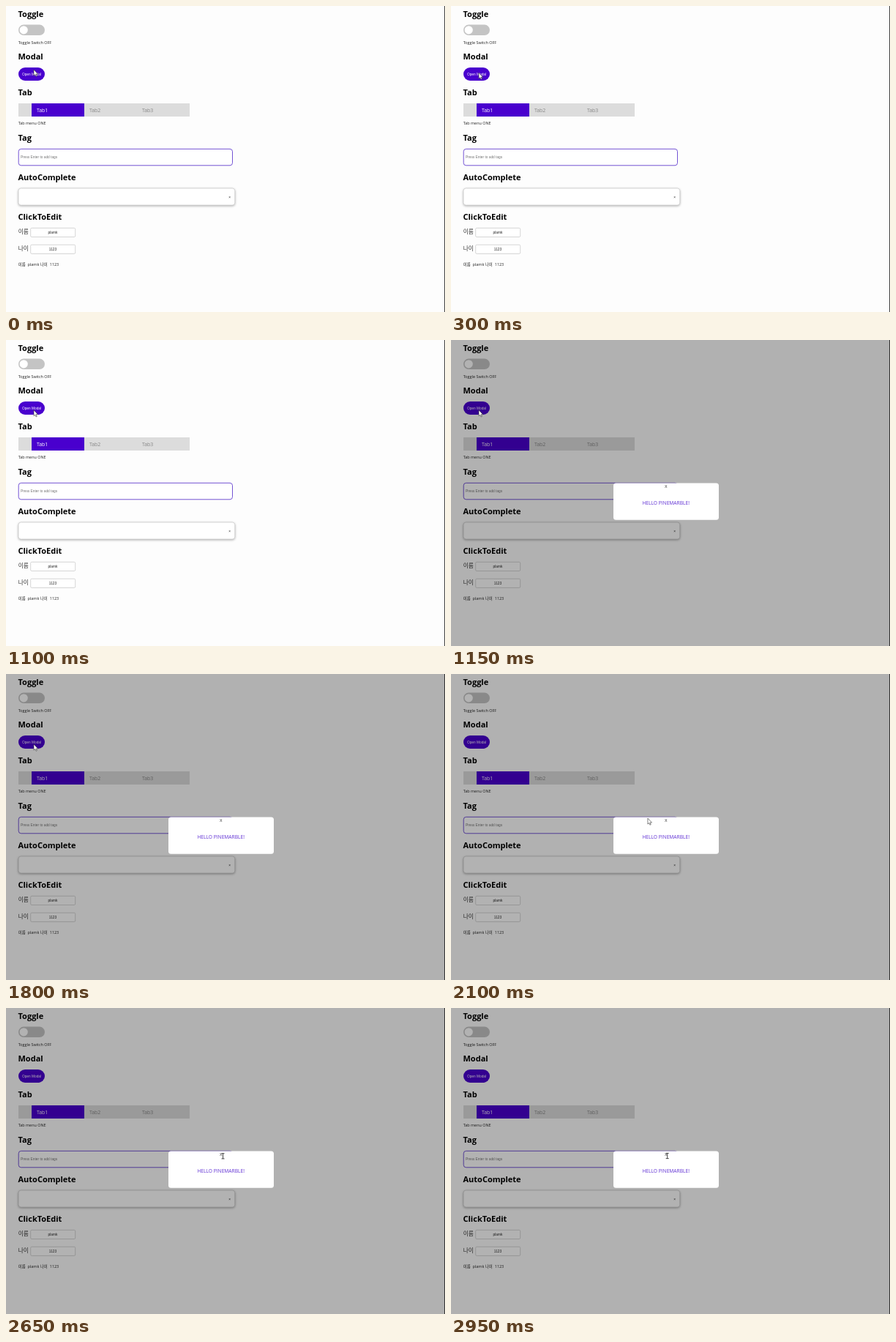
Animation, 600 px wide and 418 px high, one loop 3 s. Source, as an HTML page:

```html
<!DOCTYPE html>
<html lang="ko">
<head>
<meta charset="utf-8">
<title>UI components</title>
<style>
  html, body { margin: 0; width: 100%; height: 100%; overflow: hidden; background: #fdfdfd; }
  svg { display: block; width: 600px; height: 418px; }
  text { font: 5.45px "Open Sans", "Noto Sans CJK KR", "Noto Sans CJK", sans-serif; fill: #222; }
  .head text { font-size: 11px; font-weight: 700; fill: #000; }
  .tab text { font-size: 6.9px; fill: #888; }
  .form text { font: 4.8px "Liberation Sans", Arial, sans-serif; }
  .label text { font-size: 7.6px; fill: #333; }
  .mid { text-anchor: middle; }
  .box { fill: #fff; stroke: #ccc; stroke-width: .8; }
  .card { filter: drop-shadow(0 1.5px 1.5px rgba(0, 0, 0, .3)); }
</style>
</head>
<body>
<svg viewBox="0 0 600 418">
  <rect width="600" height="418" fill="#fdfdfd"/>

  <g class="head">
    <text x="16.5" y="15">Toggle</text>
    <text x="16.5" y="73">Modal</text>
    <text x="16.5" y="122">Tab</text>
    <text x="16.5" y="184">Tag</text>
    <text x="16.5" y="238">AutoComplete</text>
    <text x="16.5" y="292">ClickToEdit</text>
  </g>

  <rect x="17" y="25.6" width="36" height="14.4" rx="7.2" fill="#c4c4c4"/>
  <circle cx="24.2" cy="32.8" r="5.6" fill="#fff"/>
  <text x="16.7" y="52">Toggle Switch OFF</text>

  <rect x="17" y="84" width="36" height="18" rx="9" fill="#4900ce"/>

  <g class="tab">
    <rect x="17" y="133" width="234" height="18" fill="#dcdcdc"/>
    <rect x="35" y="133" width="72" height="18" fill="#4900ce"/>
    <text x="42" y="144.5" style="fill:#fff">Tab1</text>
    <text x="114" y="144.5">Tab2</text>
    <text x="186" y="144.5">Tab3</text>
  </g>
  <text x="16.7" y="162.4">Tab menu ONE</text>

  <rect x="17.2" y="195.3" width="292.3" height="22.5" rx="3.5" fill="#fff" stroke="#6440d0" stroke-width=".9"/>
  <rect class="box card" x="17" y="249" width="295.8" height="23" rx="3.5"/>
  <rect class="box" x="33.7" y="303.3" width="61" height="12.2" rx="1.5"/>
  <rect class="box" x="33.7" y="326.2" width="61" height="12.2" rx="1.5"/>

  <g class="form">
    <text x="35" y="94.8" class="mid" style="fill:#fff">Open Modal</text>
    <text x="20" y="208" style="fill:#757575">Press Enter to add tags</text>
    <text x="305.6" y="262.5" class="mid">×</text>
    <text x="64" y="311" class="mid">plamk</text>
    <text x="64" y="334" class="mid">1123</text>
  </g>

  <g class="label">
    <text x="16.7" y="311">이름</text>
    <text x="16.7" y="334">나이</text>
  </g>
  <text x="16.8" y="355.4">이름</text>
  <text x="29.6" y="355.4">plamk</text>
  <text x="46.8" y="355.4">나이</text>
  <text x="59.8" y="355.4">1123</text>

  <rect x="599" width="1" height="418" fill="#444"/>

  <g id="modal">
    <rect width="600" height="418" fill="#000" opacity=".3"/>
    <rect x="222" y="195.5" width="144" height="50.3" rx="3.6" fill="#fff"/>
    <text x="293.7" y="202" class="mid">X</text>
    <text x="293.7" y="225.2" class="mid" style="font-size:6.67px;fill:#6030d4">HELLO PINEMARBLE!</text>
  </g>

  <g id="cursor">
    <path id="arrow" d="M0 0V8L1.8 6.4L3 9.2L4.3 8.6L3.1 6H5.6Z" fill="#fff" stroke="#333" stroke-width=".6"/>
    <path id="beam" d="M-2 -3.6H2M0 -3.6V3.6M-2 3.6H2" fill="none" stroke="#333" stroke-width=".9"/>
  </g>
</svg>
<script>
const LOOP = 3000, STEP = 50, OPEN = 1150, BEAM = 2650;
// Pointer stops: time, x, y
const stops = [
  [0, 38, 87], [150, 38, 87], [450, 38, 95.5], [1850, 38, 96],
  [2200, 326, 222], [2400, 307, 206], [2700, 295.7, 202], [3000, 295.7, 202]
];
const [modal, cursor, arrow, beam] = ["modal", "cursor", "arrow", "beam"].map(id => document.getElementById(id));
const show = (el, on) => el.setAttribute("visibility", on ? "visible" : "hidden");
const ease = p => p * p * (3 - 2 * p);

function pointer(t) {
  const i = stops.findIndex(s => s[0] > t);
  const [t0, x0, y0] = stops[i - 1], [t1, x1, y1] = stops[i];
  const p = ease((t - t0) / (t1 - t0));
  return [x0 + (x1 - x0) * p, y0 + (y1 - y0) * p];
}

function draw(now) {
  const t = Math.floor((now % LOOP) / STEP) * STEP;
  show(modal, t >= OPEN);
  show(arrow, t < BEAM);
  show(beam, t >= BEAM);
  cursor.setAttribute("transform", `translate(${pointer(t)})`);
}

const start = performance.now();
function tick() {
  draw(performance.now() - start);
  requestAnimationFrame(tick);
}
tick();
</script>
</body>
</html>
```
